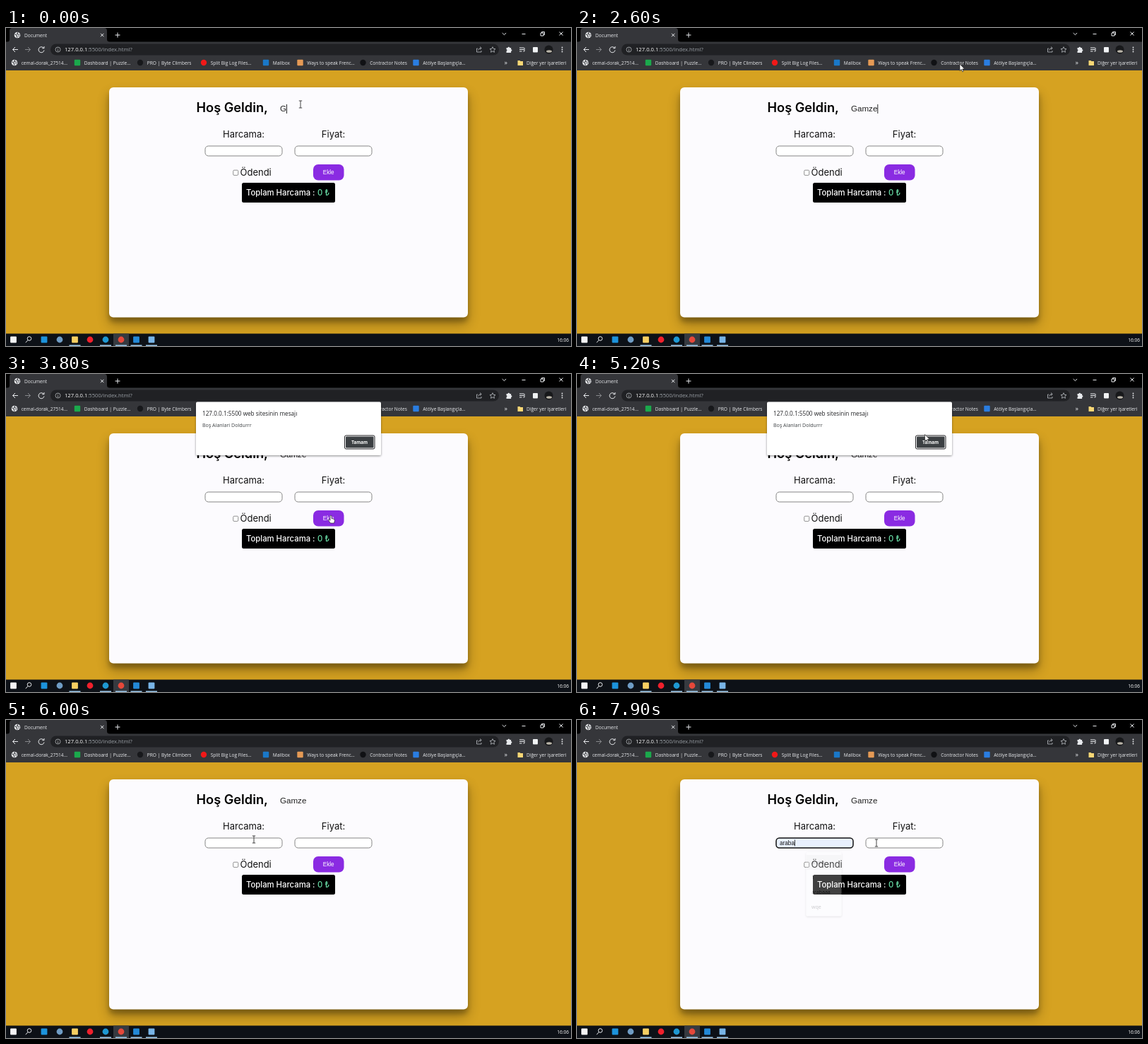
Recreate the animation shown at these times as an HTML page. Size 800 px wide and 450 px high, loop 8000 ms.

```html
<!DOCTYPE html>
<html lang="tr">
<head>
<meta charset="utf-8">
<title>Harcama</title>
<style>
  html, body { margin: 0; width: 100%; height: 100%; overflow: hidden; background: #000; }
  svg { display: block; width: 100vw; height: 100vh; }
  text { white-space: pre; }
  .ui { font-family: "Open Sans", "Noto Sans", sans-serif; }
  .page { font-family: Inter, Roboto, sans-serif; }
  .field { font-family: "Liberation Sans", Arial, sans-serif; }
  .line { fill: none; stroke: #e8eaed; stroke-width: 1; }
</style>
</head>
<body>
<svg viewBox="0 0 800 450">
  <defs>
    <filter id="soft" x="-20%" y="-20%" width="140%" height="150%"><feGaussianBlur stdDeviation="9"/></filter>
    <filter id="tight" x="-20%" y="-20%" width="140%" height="150%"><feGaussianBlur stdDeviation="3"/></filter>
    <filter id="lift" x="-10%" y="-10%" width="120%" height="130%">
      <feDropShadow dx="0" dy="1" stdDeviation="1.5" flood-opacity=".45"/>
    </filter>
    <g id="globe">
      <circle r="4.3" fill="#e8eaed"/>
      <path d="M-3.4-1.2L-.8.4-.6 2.2 0 3.6M1-3.8L-.4-2 1.2-1 3.6-.8M1.4 1.2L3 1.4" fill="none" stroke="#35363a" stroke-width="1.1"/>
    </g>
  </defs>

  <!-- Page -->
  <rect y="60" width="800" height="373" fill="#d6a221"/>
  <rect x="146" y="94" width="508" height="325" rx="6" opacity=".3" filter="url(#soft)"/>
  <rect x="146" y="91" width="508" height="325" rx="6" opacity=".22" filter="url(#tight)"/>
  <rect x="146" y="84" width="508" height="325.5" rx="6" fill="#fcfbfe"/>
  <g class="page" font-size="13" fill="#111">
    <text x="269.5" y="118.5" font-size="18.2" font-weight="600" fill="#000">Hoş Geldin,</text>
    <text x="336.5" y="155" text-anchor="middle">Harcama:</text>
    <text x="463.5" y="155" text-anchor="middle">Fiyat:</text>
    <text x="331.5" y="209">Ödendi</text>
  </g>
  <text id="name" class="field" x="388" y="118.3" font-size="11.6" fill="#222"></text>
  <rect id="nameCaret" y="108" width=".9" height="13" fill="#111"/>
  <rect id="spend" x="282" y="167" width="109" height="14" rx="4.5"/>
  <rect x="409" y="167" width="109" height="14" rx="4.5" fill="#fff" stroke="#858585"/>
  <text id="spendText" class="field" x="287" y="176.8" font-size="8.2" fill="#111"></text>
  <rect id="spendCaret" y="169.5" width=".8" height="9" fill="#111"/>
  <rect x="321.7" y="201.2" width="7" height="7.2" rx="1.4" fill="#fff" stroke="#767676" stroke-width=".8"/>
  <rect x="435" y="193" width="43.5" height="22.5" rx="7" fill="#8a2be2"/>
  <text class="field" x="456.7" y="207" font-size="8.2" fill="#fff" text-anchor="middle">Ekle</text>
  <rect x="334" y="219" width="132" height="28" rx="2.5"/>
  <g class="page" font-size="11.3" font-weight="500">
    <text x="340" y="237" fill="#fff">Toplam Harcama :</text>
    <text x="441" y="237" fill="#66d9a3">0 ₺</text>
  </g>

  <!-- Suggestions -->
  <g id="menu" class="ui" font-size="7.1" fill="#3c4043">
    <rect x="323.5" y="185" width="50" height="90.5" rx="2" fill="#fff" filter="url(#lift)"/>
    <rect id="hover" x="323.5" y="189" width="50" height="21" fill="#e8e8ea"/>
  </g>

  <!-- Browser -->
  <rect width="800" height="20"/>
  <path d="M0 60V19.5H2Q5 19.5 5 16V4Q5 0 9 0H139Q143 0 143 4V16Q143 19.5 147 19.5H800V60Z" fill="#35363a"/>
  <rect x="63" y="22.5" width="635" height="16" rx="8" fill="#202124"/>
  <use href="#globe" x="16" y="10"/>
  <g class="ui" font-size="6.6" fill="#e8eaed">
    <text x="26" y="12.5">Document</text>
    <text x="83" y="33.2" font-size="7.65" fill="#fff">127.0.0.1<tspan fill="#9aa0a6">:5500/index.html?</tspan></text>
    <text x="705.5" y="51.5" font-size="9">»</text>
    <text x="737" y="51.5">Diğer yer işaretleri</text>
  </g>
  <g id="marks" class="ui" font-size="6.6" fill="#e8eaed"></g>
  <path d="M724.5 46h3l1 1h3.500v6h-7.500z" fill="#f8d775"/>
  <g class="line">
    <path d="M134 7.800l4.400 4.400m0-4.400l-4.400 4.400M158 6.500v7m-3.500-3.500h7M702.700 7l2.700 2.700 2.700-2.700M730.500 8.500h5M757 7h4v4h-4zM758.500 7V5.500h4v4H761M783.500 5.500l5 5m0-5l-5 5"/>
    <path d="M17 30.500H9.500m3.500-3.500l-3.500 3.500 3.500 3.500M53 28a4 4 0 1 0 1 3.500M54 26v2.700h-2.700"/>
    <path d="M27 30.500h7.500m-3.500-3.500l3.500 3.500-3.500 3.500" stroke="#85878a"/>
    <path d="M73.500 30.200v2.700m0-4.500v.9M70 30.500a3.500 3.500 0 1 0 7 0 3.500 3.500 0 1 0-7 0" stroke="#b5b8bc" stroke-width=".8"/>
    <path d="M668 29h-1.500v5h6.500v-2M668.500 31.500q.5-3 4.500-3m-2-2l2.200 2-2.200 2M689 26.700l1.200 2.600 2.800.3-2.100 1.900.6 2.800-2.500-1.400-2.500 1.400.6-2.800-2.100-1.900 2.800-.3z" stroke="#bdc1c6" stroke-width=".8"/>
    <path d="M727 28h6.500M727 30.500h6.500M727 33h3.500M734 28v5h-1.500"/>
  </g>
  <path d="M708.500 28h2a1.300 1.300 0 0 1 2.600 0h2v2.200a1.300 1.300 0 0 1 0 2.600V35h-6.600v-2.300a1.300 1.300 0 0 0 0-2.500z" fill="#e8eaed"/>
  <rect x="746" y="27" width="7" height="7.500" rx="1" fill="#f1f3f4"/>
  <circle cx="768.500" cy="30.500" r="6" fill="#17181a"/>
  <ellipse cx="769" cy="33" rx="4" ry="1.800" fill="#b9b4a8"/>
  <g fill="#e8eaed"><circle cx="787.500" cy="27.500" r=".9"/><circle cx="787.500" cy="30.500" r=".9"/><circle cx="787.500" cy="33.500" r=".9"/></g>

  <!-- Taskbar -->
  <rect y="432.500" width="800" height="17.500" fill="#0d1117"/>
  <rect x="152" y="432.500" width="22" height="17.500" fill="#363a40"/>
  <g id="tasks"></g>
  <circle cx="33" cy="439.500" r="2.800" class="line"/>
  <path d="M31 441.700l-3.200 3.500" class="line"/>
  <text class="ui" x="797" y="443.500" font-size="6.600" fill="#fff" text-anchor="end">16:06</text>

  <!-- Alert -->
  <g id="alert" class="ui">
    <rect x="269" y="39.500" width="262" height="75.500" rx="2" fill="#fff" filter="url(#lift)"/>
    <text x="278" y="59" font-size="8.200" fill="#202124">127.0.0.1:5500 web sitesinin mesajı</text>
    <text x="278" y="75" font-size="7.100" fill="#3c4043">Boş Alanlari Doldurrr</text>
    <rect x="479.500" y="87" width="42.500" height="19" rx="2" fill="#fff" stroke="#202124"/>
    <rect x="481" y="88.500" width="39.500" height="16" rx="1" fill="#3c4043"/>
    <text x="500.700" y="99" font-size="6.200" font-weight="700" fill="#fff" text-anchor="middle">Tamam</text>
  </g>

  <path id="pointer" stroke-linejoin="round"/>
</svg>
<script>
const LOOP = 8000, STEP = 100;
const NS = "http://www.w3.org/2000/svg";
const $ = id => document.getElementById(id);

function add(parent, tag, attrs, text = "") {
  const el = document.createElementNS(NS, tag);
  for (const key in attrs) el.setAttribute(key, attrs[key]);
  el.textContent = text;
  parent.append(el);
  return el;
}

function set(id, attrs) {
  for (const key in attrs) $(id).setAttribute(key, attrs[key]);
}

function icon(parent, x, y, r, fill, round) {
  if (round) add(parent, "circle", { cx: x, cy: y, r, fill });
  else add(parent, "rect", { x: x - r, y: y - r, width: 2 * r, height: 2 * r, rx: 1, fill });
}

// Bookmarks: x, label, icon colour, round icon
[
  [12, "cemal-dorak_27514..."],
  [101, "Dashboard | Puzzle...", "#1ba94c", false],
  [190, "PRO | Byte Climbers", "#17181b", true],
  [280, "Split Big Log Files...", "#f01818", true],
  [368, "Mailbox", "#1a78c8", false],
  [416.5, "Ways to speak Frenc...", "#e59a55", false],
  [505.5, "Contractor Notes", "#101114", true],
  [580.5, "Atölye Başlangıçla...", "#2a7de1", false]
].forEach(([x, label, fill, round]) => {
  if (fill) icon($("marks"), x, 49, 4.2, fill, round);
  else add($("marks"), "use", { href: "#globe", x, y: 49 });
  add($("marks"), "text", { x: x + 9.7, y: 51.5 }, label);
});

// Taskbar: x, colour, round icon, running
[
  [10.5, "#f4f4f4", false, false],
  [54, "#1c93dc", false, false],
  [76, "#6f9cc4", true, false],
  [97.5, "#f6cf62", false, true],
  [119, "#f0202c", true, false],
  [141, "#1e98d2", true, true],
  [163, "#e5483a", true, true],
  [184.5, "#2389d7", false, true],
  [206, "#78b4e6", false, true]
].forEach(([x, fill, round, running]) => {
  icon($("tasks"), x, 441, 4.4, fill, round);
  if (running) add($("tasks"), "rect", { x: x - 8, y: 448.5, width: 16, height: 1.5, fill: "#9cc9ec" });
});

["araba", "1", "arabaaa", "wqe"].forEach((word, i) =>
  add($("menu"), "text", { x: 331, y: 202 + i * 21.1 }, word));

const shapes = {
  beam: { d: "M-2.2-5H2.2M0-5V5M-2.2 5H2.2", fill: "none", stroke: "#333", "stroke-width": .9 },
  arrow: { d: "M0 0V9.500L2.200 7.500 3.800 11 5.300 10.300 3.700 7H6.700Z", fill: "#fff", stroke: "#111", "stroke-width": .6 },
  hand: {
    d: "M-1 .8Q0-.6 1 .8V4.500L4 5.200Q5.600 5.600 5.400 7.200L4.600 11H-.6L-3.400 7.200Q-3.600 5.800-2.200 6.200L-1 7.200Z",
    fill: "#fff", stroke: "#111", "stroke-width": .6
  }
};

// Pointer path: time, x, y, shape from that time on
const path = [
  [0, 417, 108, "beam"], [2300, 417, 108, "beam"],
  [2400, 455, 84, "arrow"], [2600, 542, 51, "arrow"], [2800, 568, 95, "arrow"],
  [3000, 530, 165, "arrow"], [3200, 461, 199, "hand"], [3400, 460, 200, "hand"],
  [4000, 460, 200, "hand"], [4200, 420, 226, "arrow"], [4300, 270, 160, "arrow"],
  [4400, 165, 70, "arrow"], [4500, 310, 14, "arrow"], [4600, 560, 6, "arrow"],
  [4700, 778, 35, "arrow"], [4800, 640, 82, "arrow"], [4900, 500, 88, "arrow"],
  [5000, 492.500, 85.500, "arrow"], [5500, 492.500, 85.500, "arrow"],
  [5700, 463, 121, "beam"], [6000, 351, 169, "beam"], [6100, 350, 173, "beam"],
  [6300, 350, 176.500, "beam"], [6900, 350, 176.500, "beam"],
  [7000, 347, 187, "arrow"], [7200, 342, 199, "arrow"], [7400, 341, 202, "arrow"],
  [7600, 341, 202, "arrow"], [7700, 366, 196, "beam"], [7900, 424, 174, "beam"]
];

const clamp = v => Math.max(0, Math.min(1, v));
const ramp = (t, from, to) => clamp((t - from) / (to - from));
const within = (t, from, to) => t >= from && t < to;
const show = (id, on) => set(id, { visibility: on ? "visible" : "hidden" });

function pointerAt(t) {
  const i = path.findLastIndex(key => key[0] <= t);
  const a = path[i], b = path[i + 1] || a;
  const k = b === a ? 0 : ramp(t, a[0], b[0]);
  return { x: a[1] + (b[1] - a[1]) * k, y: a[2] + (b[2] - a[2]) * k, shape: a[3] };
}

function type(id, caretId, text, caretOn) {
  const el = $(id);
  el.textContent = text;
  const end = +el.getAttribute("x") + (text ? el.getComputedTextLength() : 0);
  set(caretId, { x: end });
  show(caretId, caretOn);
}

function draw(time) {
  const t = Math.floor(time / STEP) * STEP;

  const typed = 1 + [500, 1200, 1300, 1500].filter(at => t >= at).length;
  const nameCaret = t < 1100 || within(t, 1200, 2000) || within(t, 2500, 3000);
  type("name", "nameCaret", "Gamze".slice(0, typed), nameCaret);

  const focused = t >= 6500, picked = t >= 7200;
  set("spend", {
    fill: picked ? "#e8f0fe" : "#fff",
    stroke: focused ? "#101010" : "#858585",
    "stroke-width": focused ? 1.5 : 1
  });
  type("spendText", "spendCaret", picked ? "araba" : "", within(t, 6500, 7000) || t >= 7500);

  const gone = ramp(t, 7600, 8000);
  set("menu", { opacity: 1 - gone, transform: `translate(${1.3 * gone} ${2.6 * gone})` });
  show("menu", focused);
  show("hover", picked);

  const open = ramp(t, 3500, 3800) - ramp(t, 5500, 5900);
  set("alert", { opacity: open, transform: `translate(0 ${-14 * (1 - open)})` });

  const p = pointerAt(t);
  set("pointer", { ...shapes[p.shape], transform: `translate(${p.x} ${p.y})` });
}

const start = performance.now();
function tick() {
  draw((performance.now() - start) % LOOP);
  requestAnimationFrame(tick);
}
tick();
</script>
</body>
</html>
```
